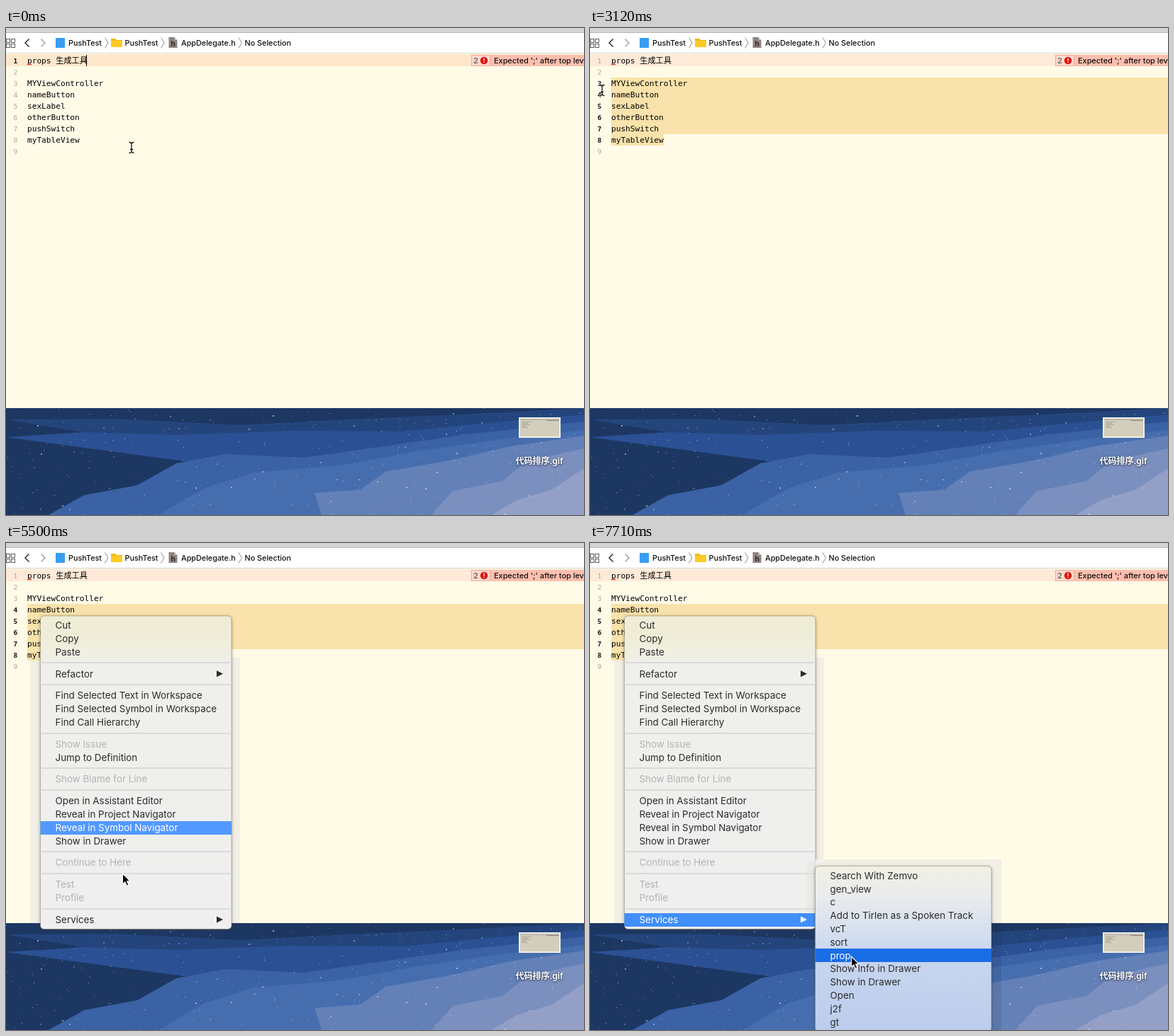
These frames come from a looping animation (815 px wide and 688 px high, 8 s). An HTML page with a canvas:

```html
<!DOCTYPE html>
<html lang="en">
<head>
<meta charset="utf-8">
<title>Editor services menu</title>
<style>
  html, body { margin: 0; width: 100%; height: 100%; overflow: hidden; }
  canvas { display: block; }
</style>
</head>
<body>
<canvas id="stage" width="815" height="688"></canvas>
<script>
const W = 815, H = 688, LOOP = 8000, DESK = 537;
const ctx = document.getElementById('stage').getContext('2d');

const UI = 'Inter, "Noto Sans CJK SC", "Noto Sans CJK", sans-serif';
const MONO = '"DejaVu Sans Mono", "Noto Sans CJK SC", "Noto Sans CJK", monospace';
const CODE_X = 30, CHAR = 6.7, ROW = 16, ITEM = 18.8, GAP = 12;

const lines = ['props 生成工具', '', 'MYViewController', 'nameButton', 'sexLabel',
  'otherButton', 'pushSwitch', 'myTableView', ''];

// "-" separator, "~" disabled, trailing ">" opens a submenu
const mainItems = ['Cut', 'Copy', 'Paste', '-', 'Refactor>', '-',
  'Find Selected Text in Workspace', 'Find Selected Symbol in Workspace', 'Find Call Hierarchy', '-',
  '~Show Issue', 'Jump to Definition', '-', '~Show Blame for Line', '-',
  'Open in Assistant Editor', 'Reveal in Project Navigator', 'Reveal in Symbol Navigator',
  'Show in Drawer', '-', '~Continue to Here', '-', '~Test', '~Profile', '-', 'Services>'];
const serviceItems = ['Search With Zemvo', 'gen_view', 'c', 'Add to Tirlen as a Spoken Track',
  'vcT', 'sort', 'prop', 'Show Info in Drawer', 'Show in Drawer', 'Open', 'j2f', 'gt'];

// time, pointer x, pointer y, highlighted item
const pointerSteps = [
  [0, 177, 169], [150, 150, 167], [300, 124, 164],
  [1340, 112, 162], [1490, 104, 160], [1630, 85, 152], [1780, 66, 136], [1930, 52, 114],
  [2070, 42, 94], [2220, 28, 82], [2370, 19, 75], [2520, 20, 77], [2670, 20, 78],
  [3120, 17, 88], [3270, 18, 92], [3410, 18, 94], [3860, 30, 100], [4010, 47, 108],
  [4460, 46, 106],
  [5060, 52, 130, 'Copy'], [5210, 76, 214, 'Find Selected Text in Workspace'],
  [5350, 125, 350, 'Jump to Definition'], [5500, 164, 467, 'Reveal in Symbol Navigator'],
  [5650, 167, 506], [5790, 167, 518],
  [6240, 167, 526, 'Services'], [6390, 167, 529, 'Services'], [6540, 174, 531, 'Services'],
  [6680, 215, 532, 'Services'], [6830, 270, 532, 'Services'], [6980, 318, 531, 'Services'],
  [7120, 342, 529, serviceItems[3]], [7270, 356, 527, serviceItems[3]],
  [7420, 363, 543, 'vcT'], [7570, 367, 566, 'sort'], [7710, 368, 584, 'prop']
];

function rect(x, y, w, h, color, c = ctx) {
  c.fillStyle = color;
  c.fillRect(x, y, w, h);
}

function text(str, x, y, font, color, align = 'left') {
  ctx.font = font;
  ctx.fillStyle = color;
  ctx.textAlign = align;
  ctx.fillText(str, x, y);
}

function trace(points, c = ctx) {
  c.beginPath();
  points.forEach(([x, y]) => c.lineTo(x, y));
}

function polygon(points, color, c = ctx) {
  trace(points, c);
  c.closePath();
  c.fillStyle = color;
  c.fill();
}

function stroke(points, color, width) {
  trace(points);
  ctx.strokeStyle = color;
  ctx.lineWidth = width;
  ctx.stroke();
}

function gradient(y0, y1, stops) {
  const g = ctx.createLinearGradient(0, y0, 0, y1);
  stops.forEach(([at, color]) => g.addColorStop(at, color));
  return g;
}

function makeWallpaper() {
  const canvas = document.createElement('canvas');
  canvas.width = W;
  canvas.height = H - DESK;
  const c = canvas.getContext('2d');
  c.translate(0, -DESK);
  rect(0, DESK, W, H, '#1d3763', c);
  const band = (color, ...edge) => polygon([...edge, [W, H]], color, c);
  band('#24457c', [0, 553], [150, 552], [330, 561], [480, 553], [640, 546], [W, 537], [W, H], [0, H]);
  band('#2b5194', [0, 578], [110, 571], [240, 575], [400, 569], [560, 570], [680, 558], [W, 546], [W, H], [0, H]);
  band('#3a62a5', [60, H], [110, 660], [185, 646], [240, 615], [310, 602], [420, 607], [560, 587], [650, 574], [W, 556]);
  band('#466eaf', [215, H], [280, 650], [350, 628], [470, 618], [580, 598], [690, 582], [W, 568]);
  band('#6380b7', [445, H], [435, 657], [500, 652], [535, 627], [630, 610], [710, 591], [W, 576]);
  band('#7c90bf', [600, H], [630, 654], [700, 640], [735, 612], [W, 594]);
  band('#939fc6', [685, H], [720, 667], [770, 652], [W, 622]);

  let seed = 73;
  const rnd = () => (seed = (seed * 16807) % 2147483647) / 2147483647;
  for (let i = 0; i < 330; i++) {
    const size = rnd() < 0.12 ? 2 : 1;
    const x = Math.floor(rnd() * W), y = DESK + Math.floor(rnd() * (H - DESK));
    rect(x, y, size, size, `rgba(205,222,248,${0.2 + rnd() * 0.55})`, c);
  }
  return canvas;
}
const wallpaper = makeWallpaper();

function drawDesktop() {
  ctx.drawImage(wallpaper, 0, DESK);
  rect(723, 550, 59, 29, '#eeeee8');
  rect(725, 552, 55, 25, '#d2cebb');
  rect(725, 552, 55, 2, '#b9b7ad');
  rect(762, 554, 18, 1, '#8e8176');
  for (let i = 0; i < 5; i++) rect(727, 556 + i * 2, i ? 6 + i % 3 * 3 : 14, 1, '#aaa798');
  ctx.save();
  ctx.shadowColor = 'rgba(0,0,0,.75)';
  ctx.shadowBlur = 3;
  ctx.shadowOffsetY = 1;
  text('代码排序.gif', 752, 615.5, '600 12px ' + UI, '#fff', 'center');
  ctx.restore();
}

function drawToolbar() {
  rect(0, 0, W, 6, '#d4d4d4');
  rect(0, 6, W, 1, '#b6b6b6');
  rect(0, 7, W, 29, '#fff');
  rect(0, 35, W, 1, '#d6d6d2');
  ctx.strokeStyle = '#5c5c5c';
  ctx.lineWidth = 1;
  for (const x of [0.5, 7.5]) for (const y of [15.5, 22.5]) ctx.strokeRect(x, y, 5, 5);
  stroke([[32.5, 15.5], [27, 21], [32.5, 26.5]], '#333', 1.5);
  stroke([[49.5, 15.5], [55, 21], [49.5, 26.5]], '#999', 1.3);
  for (const x of [139.5, 218.5, 328]) stroke([[x, 13.5], [x + 4.5, 21], [x, 28.5]], '#8c8c8c', 1);

  rect(70, 14, 13, 14, '#399ef2');
  polygon([[148, 15], [154, 15], [156, 17], [164, 17], [164, 27], [148, 27]], '#f2b90d');
  rect(148, 18, 16, 9, '#fecb25');
  polygon([[229.5, 13], [237.5, 13], [241.5, 17], [241.5, 28], [229.5, 28]], '#8e8380');
  polygon([[237.5, 13], [241.5, 17], [237.5, 17]], '#c9c2be');
  text('h', 235.5, 26, 'bold 10px ' + UI, '#332826', 'center');
  const crumbs = [['PushTest', 88], ['PushTest', 167.5], ['AppDelegate.h', 247], ['No Selection', 336.5]];
  crumbs.forEach(([label, x]) => text(label, x, 25, '500 10.8px ' + UI, '#111'));
}

function selectionStart(t, x, y) {
  if (t < 1490) return null;
  if (t >= 2370) return { row: t < 3270 ? 3 : 4, x: CODE_X };
  return {
    row: Math.min(8, Math.floor((y - 38) / ROW) + 1),
    x: CODE_X + CHAR * Math.max(0, Math.round((x - CODE_X) / CHAR))
  };
}

function drawEditor(t, x, y) {
  const sel = selectionStart(t, x, y);
  const endX = CODE_X + lines[7].length * CHAR;
  rect(0, 36, W, DESK - 36, '#fffbe7');
  rect(0, 37, W, 17, sel ? '#ffead8' : '#ffe7cb');

  if (sel) {
    for (let row = sel.row; row <= 8; row++) {
      const from = row === sel.row ? sel.x : CODE_X;
      rect(from, 38 + (row - 1) * ROW, (row === 8 ? endX : W) - from, ROW, '#f9e2ab');
    }
  }

  lines.forEach((line, i) => {
    const base = 50 + i * ROW;
    const active = sel ? i + 1 >= sel.row && i < 8 : i === 0;
    text(i + 1, 16.3, base, (active ? 'bold ' : '') + '9.5px ' + MONO, active ? '#111' : '#aaa79c', 'right');
    text(line, CODE_X, base, '500 11.15px ' + MONO, '#000');
  });
  stroke([[30, 52], [31.5, 51], [33, 52], [34.5, 51], [36, 52]], '#e02a20', 1.2);

  rect(656, 38, W - 656, 16, '#ffbfae');
  rect(656.5, 38.5, 26, 15, '#ffd9cc');
  ctx.strokeStyle = '#f4a898';
  ctx.lineWidth = 1;
  ctx.strokeRect(656.5, 38.5, 26, 15);
  text('2', 659, 50, '600 11px ' + UI, '#6c625f');
  ctx.beginPath();
  ctx.arc(674, 46, 5.2, 0, Math.PI * 2);
  ctx.fillStyle = '#e0120f';
  ctx.fill();
  rect(673.4, 42.5, 1.3, 4.2, '#fff');
  rect(673.4, 47.8, 1.3, 1.4, '#fff');
  text("Expected ';' after top level declarator", 688, 50, '500 10.9px ' + UI, '#111');

  if (t < 150 || (t >= 750 && t < 1340)) rect(113, 38, 1, 16, '#000');
}

function drawMenu(x, y, w, items, picked, pickColor, fill) {
  const gaps = items.filter(s => s === '-').length;
  const h = 8 + (items.length - gaps) * ITEM + gaps * GAP;
  ctx.save();
  ctx.shadowColor = 'rgba(60,55,35,.45)';
  ctx.shadowBlur = 5;
  ctx.shadowOffsetY = 1;
  ctx.beginPath();
  ctx.roundRect(x, y, w, h, 5);
  ctx.fillStyle = fill;
  ctx.fill();
  ctx.restore();
  ctx.strokeStyle = 'rgba(110,105,85,.4)';
  ctx.lineWidth = 1;
  ctx.stroke();

  let top = y + 4;
  for (const item of items) {
    if (item === '-') {
      rect(x, Math.round(top + 5), w, 2, '#dadbd8');
      top += GAP;
      continue;
    }
    const label = item.replace(/[~>]/g, '');
    const on = label === picked;
    const color = on ? '#fff' : item[0] === '~' ? '#b3b4b3' : '#2b2b2b';
    if (on) rect(x, Math.round(top), w, 19, pickColor);
    text(label, x + 21, top + 14.2, '13.4px ' + UI, color);
    if (item.endsWith('>')) {
      const mid = top + ITEM / 2;
      polygon([[x + 248.5, mid - 4.5], [x + 257.5, mid], [x + 248.5, mid + 4.5]], color);
    }
    top += ITEM;
  }
}

function drawMenus(t, picked) {
  if (t < 4460) return;
  const halo = '#f1efe6';
  const rightTop = t < 5060 ? 150 : 162;
  rect(34, 166, 14, DESK - 166, halo);
  rect(318, rightTop, 11.5, DESK - rightTop, halo);
  const open = t >= 6540;
  const mainPick = open ? 'Services' : picked;
  drawMenu(48.5, 103, 269.5, mainItems, mainPick, mainPick === 'Services' ? '#418ffb' : '#5299ff',
    gradient(103, 545, [[0, '#eeecd4'], [0.09, '#f0eeda'], [0.15, '#efefeb'], [1, '#efefef']]));
  if (!open) return;
  rect(318, 447, 262, DESK - 447, halo);
  rect(306, 450, 12, 73, 'rgba(225,225,222,.45)');
  rect(566, DESK, 14, H - DESK, 'rgba(20,35,70,.1)');
  drawMenu(317.5, 456.5, 248.5, serviceItems, picked, '#1b6de6',
    gradient(457, H, [[0, '#f1f0e5'], [0.18, '#eaeceb'], [0.35, '#dae2ee'], [0.52, '#c8d6ef'], [1, '#bccdec']]));
}

function drawBeam(x, y) {
  const shape = () => {
    ctx.beginPath();
    ctx.moveTo(x - 3.5, y - 7.5);
    ctx.quadraticCurveTo(x, y - 7.5, x, y - 5);
    ctx.quadraticCurveTo(x, y - 7.5, x + 3.5, y - 7.5);
    ctx.moveTo(x, y - 5);
    ctx.lineTo(x, y + 5);
    ctx.quadraticCurveTo(x, y + 7.5, x - 3.5, y + 7.5);
    ctx.moveTo(x, y + 5);
    ctx.quadraticCurveTo(x, y + 7.5, x + 3.5, y + 7.5);
    ctx.moveTo(x - 2, y + 2.5);
    ctx.lineTo(x + 2, y + 2.5);
    ctx.stroke();
  };
  ctx.strokeStyle = 'rgba(255,255,255,.75)';
  ctx.lineWidth = 2.8;
  shape();
  ctx.strokeStyle = '#111';
  ctx.lineWidth = 1.3;
  shape();
}

function drawArrow(x, y) {
  const shape = [[0, 0], [0, 15], [3.4, 11.8], [5.8, 17.3], [8.4, 16.2], [6, 10.8], [10.6, 10.8]];
  const points = shape.map(([dx, dy]) => [x + dx + 0.5, y + dy]);
  polygon(points, '#000');
  ctx.strokeStyle = '#fff';
  ctx.lineWidth = 1.1;
  ctx.lineJoin = 'round';
  ctx.stroke();
  ctx.lineJoin = 'miter';
}

function render(t) {
  const [, x, y, picked] = pointerSteps.findLast(step => step[0] <= t);
  drawDesktop();
  drawEditor(t, x, y);
  drawToolbar();
  drawMenus(t, picked);
  (t < 4460 ? drawBeam : drawArrow)(x, y);
}

const start = performance.now();
function tick() {
  render((performance.now() - start) % LOOP);
  requestAnimationFrame(tick);
}
tick();
</script>
</body>
</html>
```
